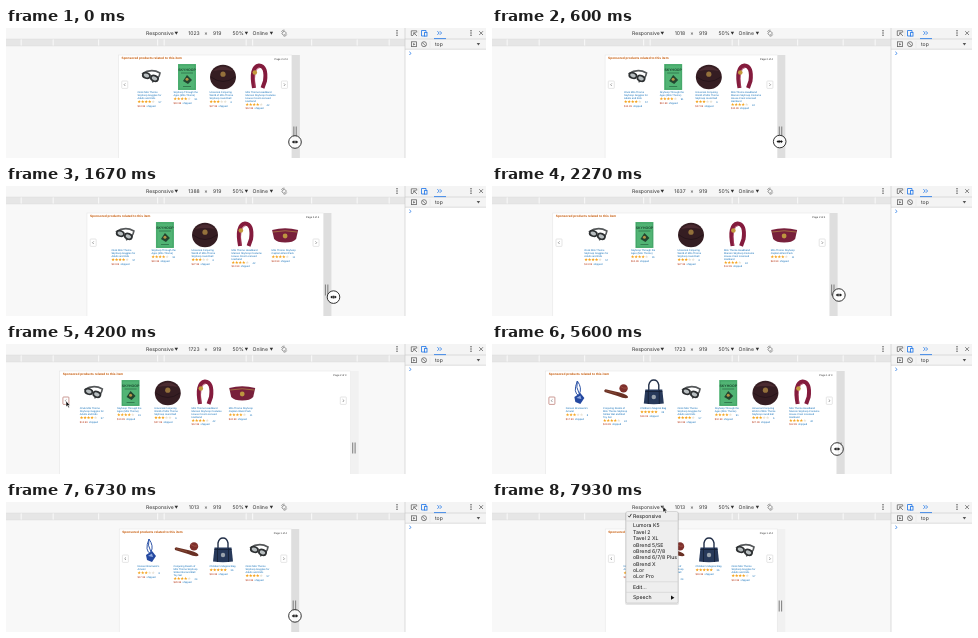
Animation of 480x130 px, one loop 8 s. Source, as an HTML page:

```html
<!DOCTYPE html>
<html lang="en">
<head>
<meta charset="utf-8">
<title>Responsive carousel</title>
<style>
html, body { margin: 0; width: 100%; height: 100%; overflow: hidden; background: #f8f8f8; }
svg { display: block; width: 480px; height: 130px; text-rendering: geometricPrecision; }
.ui { font: 5.1px Inter, "Liberation Sans", sans-serif; fill: #333; }
.menu { font-size: 5.2px; fill: #111; }
.page { font: 2.55px "Liberation Sans", Arial, sans-serif; }
.head { font-size: 3.2px; font-weight: bold; fill: #c45500; }
.link { fill: #0869b5; }
.price { fill: #b12704; }
.star { fill: #f5a623; }
.off { fill: #e9e3d6; }
</style>
</head>
<body>
<svg viewBox="0 0 480 130">
  <rect width="480" height="130" fill="#f8f8f8"/>
  <g id="device">
    <rect id="bar" y="27" width="8" height="103"/>
    <path id="grip" d="M-1.2 98.5V109.5M1.2 98.5V109.5" stroke="#858585" stroke-width="1.1"/>
    <rect id="sheet" y="27" height="104" fill="#fff" stroke="#e2e2e2" stroke-width=".5"/>
    <g class="page">
      <text id="head" class="head" y="31.4">Sponsored products related to this item</text>
      <text id="count" y="32" text-anchor="end" fill="#222"></text>
      <g id="cards"></g>
      <g id="prev"><rect x="-3" y="53" width="6" height="7.4" rx=".7" fill="#fff" stroke-width=".6"/><path d="M.6 55.4L-.7 56.7L.6 58" fill="none" stroke="#666" stroke-width=".6"/></g>
      <g id="next"><rect x="-3" y="53" width="6" height="7.4" rx=".7" fill="#fff" stroke="#d5d5d5" stroke-width=".6"/><path d="M-.6 55.4L.7 56.7L-.6 58" fill="none" stroke="#666" stroke-width=".6"/></g>
    </g>
  </g>

  <rect width="480" height="11" fill="#f6f6f6"/>
  <rect y="11" width="399" height="7" fill="#e6e6e6"/>
  <path d="M0 11H399M0 18H399" stroke="#d6d6d6" stroke-width=".4"/>
  <path id="ticks" stroke="#fafafa" stroke-width="1"/>
  <g class="ui">
    <text x="140" y="7">Responsive</text>
    <text id="size" x="188" y="7" text-anchor="middle"></text>
    <text x="200" y="7" text-anchor="middle">×</text>
    <text x="207" y="7">919</text>
    <text x="226.5" y="7">50%</text>
    <text x="246.5" y="7">Online</text>
    <path d="M168.5 3.7h3.6l-1.8 3zM238.7 3.7h3.4l-1.7 3zM263.7 3.7h3.4l-1.7 3z"/>
    <rect x="276.6" y="3.4" width="3" height="3.6" rx=".4" transform="rotate(45 278 5.2)" fill="none" stroke="#666" stroke-width=".7"/>
    <path d="M275.4 4A3 3 0 0 1 278.4 2M280.8 6.4A3 3 0 0 1 277.8 8.3" fill="none" stroke="#666" stroke-width=".6"/>
  </g>

  <rect x="399" width="81" height="130" fill="#fff"/>
  <rect x="399" width="81" height="21.2" fill="#f4f4f4"/>
  <path d="M399 0V130M399 11H480M399 21.2H480" stroke="#c8c8c8" stroke-width=".6"/>
  <path d="M412.8 2V9M424 13V20" stroke="#ccc" stroke-width=".5" opacity=".5"/>
  <g fill="none" stroke="#666" stroke-width=".8">
    <path d="M407 7.5H405.3V2.8H410.7V4.6M407.7 4.8L411 8M407.7 7.2V4.8H410"/>
    <rect x="405.4" y="13.8" width="5" height="4.8"/>
    <path d="M407.2 14.9L409.3 16.2L407.2 17.5Z" fill="#666" stroke="none"/>
    <circle cx="418" cy="16.2" r="2.5"/><path d="M416.3 14.5L419.7 17.9M473.2 3.2L477 7M477 3.2L473.2 7"/>
    <g stroke="#1a73e8"><path d="M419 8H415.5V2.5H420V4"/><rect x="418.6" y="4.5" width="2.4" height="3.6"/><path d="M431.4 3.2L433.2 5L431.4 6.8M433.8 3.2L435.6 5L433.8 6.8M428 10.6H440"/><path d="M403.4 23.8L405 25.4L403.4 27"/></g>
  </g>
  <g fill="#555"><g id="dots"></g><path d="M470.7 15h3.4l-1.7 2.6z"/></g>
  <text class="ui" x="429" y="18">top</text>

  <g id="menu" class="ui menu"></g>
  <g id="cursor">
    <g id="ring"><circle r="6.3" fill="#fff" fill-opacity=".85" stroke="#333" stroke-width="1"/><path d="M-3.2 0L-1.2 -1.6V-.5H1.2V-1.6L3.2 0L1.2 1.6V.5H-1.2V1.6Z" fill="#111"/><path d="M0 -1.5V1.5" stroke="#111" stroke-width=".7"/></g>
    <path id="arrow" d="M0 0V5.8L1.4 4.6L2.4 6.8L3.4 6.3L2.4 4.2H4.2Z" fill="#111" stroke="#fff" stroke-width=".5"/>
  </g>
</svg>
<script>
const LOOP = 8000, STEP = 200 / 3, MID = 199.2;
const $ = id => document.getElementById(id);
const put = (id, name, value) => $(id).setAttribute(name, value);
const show = (node, on) => { node.style.display = on ? '' : 'none'; };

// Pictures are centred on 0,49.
const pictures = {
  pendant: `<path d="M-2 37Q3 44 0 50Q-4 43 -2 37M-2 37Q-7 49 0 52" fill="none" stroke="#2f55a8" stroke-width="1"/>
    <path d="M-5 53L1 49L5 54L1 60L-4 58Z" fill="#2448a0"/><path d="M-3 54L1 51.5L2 55Z" fill="#8fa9df"/>`,
  bat: `<path d="M-12.3 46.3L-11 45.3L3 48.6Q12 51 11.5 53.5Q9.5 55.5 1 52L-12 48Z" fill="#693024"/>
    <path d="M-11 46.7L0 49.6" stroke="#9b5a3d" stroke-width=".6"/>
    <circle cx="7" cy="44.4" r="4.2" fill="#7e302c"/><path d="M4 42.5Q7 45 10.5 44" fill="none" stroke="#b06050" stroke-width=".6"/>`,
  bag: `<path d="M-5 47V41Q-4 36 0 36Q4 36 5 41V47" fill="none" stroke="#222f48" stroke-width="1.4"/>
    <path d="M-8.5 45.5H8.5L10 59.5Q0 61 -10 59.5Z" fill="#27395a"/><path d="M-8.5 47.5H8.5M-5.5 46V60M5.5 46V60" stroke="#172238" stroke-width=".9"/>
    <circle cy="53" r="2.2" fill="#9aa3ad"/>`,
  goggles: `<path d="M-9 46Q0 40 9 45Q8 52 1 54" fill="none" stroke="#55585a" stroke-width="1.7"/>
    <g fill="#b8bec0" stroke="#2d3032" stroke-width="1.7"><ellipse cx="-4.6" cy="47.5" rx="3.7" ry="2.7" transform="rotate(20 -4.6 47.5)"/><ellipse cx="3.5" cy="50.4" rx="3.7" ry="2.7" transform="rotate(20 3.5 50.4)"/></g>`,
  book: `<rect x="-9" y="36" width="18" height="26" fill="#51b474"/><rect x="-8" y="37" width="16" height="24" fill="none" stroke="#3d9860" stroke-width=".5"/>
    <text y="43.4" text-anchor="middle" font-size="3.5" font-weight="bold" fill="#1d4a31">SKYHOOP</text>
    <path d="M-6 45H6" stroke="#286641" stroke-width=".7"/><path d="M0 47L5 52L1 56L-4 53Z" fill="#23452f"/><circle cy="51.3" r="1.5" fill="#b79546"/><path d="M-4 58.5H4" stroke="#286641" stroke-width=".7"/>`,
  ball: `<ellipse cy="49" rx="13" ry="12.2" fill="#351d22"/><path d="M-10 43Q0 34 10 43Q0 41 -10 43" fill="#4b2b31"/>
    <path d="M-12 49Q0 58 12 49" fill="none" stroke="#24141a" stroke-width=".8"/><circle cy="46.2" r="2.6" fill="#94713b"/>`,
  band: `<path d="M-5 60Q-9 39 0 37.5Q8 38 6 53L3.5 60" fill="none" stroke="#841b3d" stroke-width="4"/>
    <path d="M-4 59Q-6 40 1 39.5" fill="none" stroke="#af4262" stroke-width=".7"/><circle cx="-4.2" cy="44.5" r="2.3" fill="#c39a3d"/>`,
  pouch: `<path d="M-13 44Q0 40.5 13 44L11 53Q8 56.5 0 56.5Q-8 56.5 -11 53Z" fill="#78203b"/>
    <path d="M-12 46Q0 43.5 12 46" fill="none" stroke="#b38a45" stroke-width=".7"/><circle cy="50" r="2.4" fill="#bd9640"/>`
};

const goods = [
  ['pendant', 'Noreen Bramwick\'s|Amulet', 3, '8', '$17.99'],
  ['bat', 'Conjuring Realm of|Milo Thorne Skyhoop|Striker Bat and Ball|Toy Set', 4, '24', '$29.99'],
  ['bag', 'Children\'s Magical Bag', 5, '36', '$19.99'],
  ['goggles', 'Orvik Milo Thorne|Skyhoop Goggles for|Adults and Kids', 4, '57', '$13.99'],
  ['book', 'Skyhoop Through the|Ages (Milo Thorne)', 4, '91', '$10.99'],
  ['ball', 'Universal Conjuring|World of Milo Thorne|Skyhoop round ball', 3, '6', '$27.99'],
  ['band', 'Milo Thorne Headband|Maroon Skyhoop Costume|House Crest Licensed|Hairband', 4, '42', '$12.99'],
  ['pouch', 'Milo Thorne Skyhoop|Captain Waist Pack', 4, '11', '$24.99']
];

const star = (x, y, on) => {
  let d = '';
  for (let i = 0; i < 10; i++) {
    const r = i % 2 ? .75 : 1.75, a = i * Math.PI / 5;
    d += `${i ? 'L' : 'M'}${(x + r * Math.sin(a)).toFixed(2)} ${(y - r * Math.cos(a)).toFixed(2)}`;
  }
  return `<path class="${on ? 'star' : 'off'}" d="${d}Z"/>`;
};

const card = ([pic, title, rating, votes, price]) => {
  const lines = title.split('|'), y = 65 + lines.length * 2.9;
  const text = lines.map((s, i) => `<text class="link" x="-13.5" y="${65 + i * 2.9}">${s}</text>`).join('');
  const stars = [0, 1, 2, 3, 4].map(i => star(-11.8 + i * 3.5, y, i < rating)).join('');
  return `<g>${pictures[pic]}${text}${stars}<text class="link" x="7.5" y="${y + 1}">${votes}</text>
    <text class="price" x="-13.5" y="${y + 4.8}">${price}</text><text class="link" x="-4.4" y="${y + 4.8}">shipped</text></g>`;
};
$('cards').innerHTML = goods.map(card).join('');
const cards = [...$('cards').children];

put('ticks', 'd', [41, 47.5, 106.5, 152, 184].map(d => `M${MID - d} 11.4V17.6M${MID + d} 11.4V17.6`).join(''));
$('dots').innerHTML = [391, 465].map(x => [2.8, 5, 7.2].map(y => `<circle cx="${x}" cy="${y}" r=".75"/>`).join('')).join('');

const devices = ['Lumora K5', 'Tavel 2', 'Tavel 2 XL', 'oBrend 5/SE', 'oBrend 6/7/8', 'oBrend 6/7/8 Plus', 'oBrend X', 'oLor', 'oLor Pro'];
const item = (s, y) => `<text x="141" y="${y}">${s}</text>`;
$('menu').innerHTML = `<rect x="133" y="10" width="54" height="93" rx="2" fill="#000" opacity=".1"/>
  <rect x="134" y="9.5" width="52" height="91.5" rx="1.6" fill="#eee" stroke="#bbb" stroke-width=".5"/>
  <path d="M134 19H186M134 79.8H186M134 90.3H186" stroke="#d3d3d3" stroke-width=".7"/>
  <path d="M136.2 13.8L137.4 15.2L139.4 11.9" fill="none" stroke="#111" stroke-width=".8"/>
  ${item('Responsive', 15.5)}${devices.map((s, i) => item(s, 25.4 + i * 6.38)).join('')}
  ${item('Edit…', 87)}${item('Speech', 97.4)}<path d="M179 93.6V97.8L182.4 95.7Z"/>`;

// Each key is [time, value, ...].
const pageKeys = [[0, 173.3], [400, 172.4], [870, 172], [1200, 172], [1430, 212], [1730, 243], [2270, 277], [2600, 291],
  [5670, 291], [6130, 231], [6470, 190], [6730, 172]];
const flowKeys = [[0, 174.5], [870, 172.5], [1200, 172], [1430, 215], [1730, 235], [2270, 263.5], [2660, 291],
  [5670, 291], [6000, 250], [6130, 230.5], [6470, 195], [6730, 174.5]];
const sizeKeys = [[0, 1023], [870, 1016], [1200, 1016], [1730, 1438], [2270, 1638], [2600, 1723],
  [5670, 1723], [6130, 1328], [6470, 1085], [6730, 1013]];
const pathKeys = [[0, 289, 114], [400, 286, 114], [870, 290, 113], [1200, 309, 112], [1730, 330, 111], [2270, 347, 109],
  [2600, 353, 108], [2870, 396, 76], [3070, 404, 66], [3600, 430, 24], [3930, 433, 14], [4000, 425, 16], [4200, 60, 57],
  [4800, 62, 58], [5400, 342, 104], [5600, 345, 105], [5800, 338, 107], [6130, 306, 111], [6470, 292, 113],
  [6730, 289, 114], [6900, 287, 108], [7500, 178, 10], [7670, 171, 4.5]];

function at(keys, t, k = 1) {
  const i = keys.findIndex(key => key[0] > t);
  if (i < 0) return keys[keys.length - 1][k];
  const a = keys[i - 1], b = keys[i];
  return a[k] + (b[k] - a[k]) * (t - a[0]) / (b[0] - a[0]);
}

const columns = t => t < 1430 ? 4 : t < 2660 ? 5 : t < 5990 ? 7 : t < 6460 ? 5 : 4;

function render(t) {
  const w = at(pageKeys, t), left = MID - w / 2, right = MID + w / 2;
  const n = columns(t), gap = (at(flowKeys, t) - 30.5) / n;
  const turned = t >= 4590, first = turned ? 0 : 3;
  const held = t < 2640 || (t > 5460 && t < 6760);

  put('sheet', 'x', left);
  put('sheet', 'width', w);
  put('bar', 'x', right);
  put('bar', 'fill', held ? '#dedede' : '#f1f1f1');
  put('grip', 'transform', `translate(${right + 3.2} 0)`);
  put('head', 'x', left + 3);
  put('count', 'x', right - 4.3);
  $('count').textContent = `Page ${turned ? 1 : n > 5 ? 2 : n > 4 ? 2 : 2} of ${Math.ceil(16 / n)}`;
  put('prev', 'transform', `translate(${left + 6.2} 0)`);
  put('prev', 'stroke', t > 4190 && t < 6700 ? '#a9584d' : '#d5d5d5');
  put('next', 'transform', `translate(${right - 7.4} 0)`);
  $('size').textContent = Math.round(at(sizeKeys, t));

  cards.forEach((node, i) => {
    const slot = i - first;
    show(node, slot >= 0 && slot < n);
    node.setAttribute('transform', `translate(${MID - .2 + (slot - (n - 1) / 2) * gap} 0)`);
  });
  put('cards', 'opacity', t > 4390 && t < 4720 ? .4 : 1);

  show($('menu'), t >= 7725);
  show($('ring'), held);
  show($('arrow'), !held);
  put('cursor', 'transform', `translate(${at(pathKeys, t)} ${at(pathKeys, t, 2)})`);
}

function tick() {
  const t = performance.now() % LOOP;
  render(Math.floor((t + 5) / STEP) * STEP % LOOP);
  requestAnimationFrame(tick);
}
tick();
</script>
</body>
</html>
```
